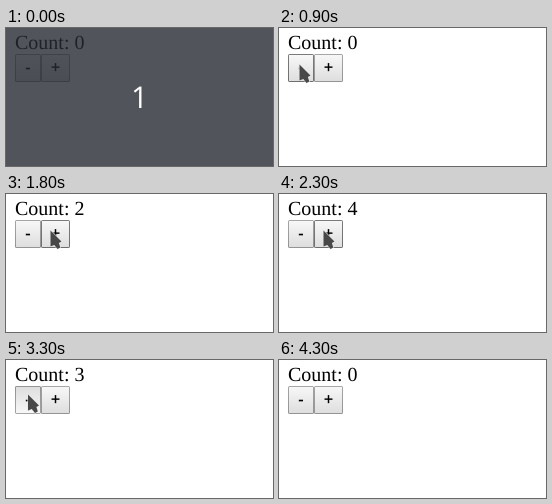
These frames come from a looping animation (267x138 px, 4900 ms). An HTML page with a canvas:

```html
<!DOCTYPE html>
<html lang="en">
<head>
<meta charset="utf-8">
<title>Counter</title>
<style>
  html, body { margin: 0; width: 100%; height: 100%; overflow: hidden; background: #fff; }
  canvas { display: block; width: 267px; height: 138px; }
</style>
</head>
<body>
<canvas id="stage"></canvas>
<script>
const W = 267, H = 138, LOOP = 4900, TICK = 100;
const canvas = document.getElementById('stage');
const ctx = canvas.getContext('2d');
const ratio = window.devicePixelRatio || 1;
canvas.width = W * ratio;
canvas.height = H * ratio;
ctx.scale(ratio, ratio);
ctx.textRendering = 'geometricPrecision';

const SERIF = '20px "Liberation Serif", serif';
const LABEL = '600 16.67px "Open Sans", "Noto Sans", sans-serif';
const DIGIT = '30px "Open Sans", "Noto Sans", sans-serif';

// Each button is clicked four times at a steady pace
const CLICKS = 4, HOLD = 100;
const buttons = [
  { label: '-', x: 9, w: 26, change: -1, first: 3100, every: 300 },
  { label: '+', x: 35, w: 29, change: 1, first: 1500, every: 265 }
];
const TOP = 26, HEIGHT = 28;

// The pointer is visible between SHOW and HIDE and travels through these moves
const SHOW = 600, HIDE = 4300;
const entry = { x: 54, y: 45 };
const moves = [
  { from: 600, to: 900, x: 20.5, y: 36.5 },
  { from: 1000, to: 1100, x: 37, y: 36 },
  { from: 1200, to: 1400, x: 44.5, y: 36.5 },
  { from: 2500, to: 2900, x: 22, y: 34.5 },
  { from: 4100, to: 4300, x: 18, y: 12 }
];

const clamp = (v, lo, hi) => Math.min(hi, Math.max(lo, v));

function pointerAt(t) {
  if (t < SHOW || t >= HIDE) return null;
  let { x, y } = entry;
  for (const m of moves) {
    const k = clamp((t - m.from) / (m.to - m.from), 0, 1);
    x += (m.x - x) * k;
    y += (m.y - y) * k;
  }
  return { x, y };
}

function clicksDone(b, t) {
  return clamp(Math.floor((t - b.first) / b.every) + 1, 0, CLICKS);
}

function countAt(t) {
  return buttons.reduce((sum, b) => sum + b.change * clicksDone(b, t), 0);
}

function text(str, x, y, font, color, align = 'left') {
  ctx.font = font;
  ctx.fillStyle = color;
  ctx.textAlign = align;
  ctx.fillText(str, x, y);
}

function drawButton(b, t, pointer) {
  const { label, x, w } = b;
  const over = pointer && pointer.x >= x && pointer.x < x + w &&
    pointer.y >= TOP && pointer.y < TOP + HEIGHT;
  const down = over && clicksDone(b, t + HOLD) > clicksDone(b, t);
  const fill = ctx.createLinearGradient(0, TOP, 0, TOP + HEIGHT);
  fill.addColorStop(0, down ? '#ddd' : '#f8f8f8');
  fill.addColorStop(1, down ? '#f8f8f8' : '#ddd');
  ctx.fillStyle = fill;
  ctx.fillRect(x, TOP, w, HEIGHT);
  ctx.beginPath();
  ctx.roundRect(x + 0.5, TOP + 0.5, w - 1, HEIGHT - 1, 1);
  ctx.strokeStyle = over && !down ? 'rgba(0,0,0,.5)' : 'rgba(0,0,0,.333)';
  ctx.lineWidth = 1;
  ctx.stroke();
  text(label, x + w / 2, 45, LABEL, '#000', 'center');
}

function drawPointer({ x, y }) {
  const arrow = new Path2D('M0 0V16L3.8 14.4L7 18.5L9.8 17L8.4 12.4L11 11Z');
  ctx.save();
  ctx.translate(x, y);
  ctx.lineJoin = 'round';
  ctx.lineWidth = 1.2;
  ctx.strokeStyle = 'rgba(235,235,235,.9)';
  ctx.stroke(arrow);
  ctx.fillStyle = '#484848';
  ctx.fill(arrow);
  ctx.restore();
}

function drawCountdown() {
  ctx.fillStyle = 'rgba(38,42,49,.8)';
  ctx.fillRect(0, 0, W, H);
  text('1', 133.5, 80, DIGIT, '#fff', 'center');
}

function draw(t) {
  const pointer = pointerAt(t);
  ctx.fillStyle = '#fff';
  ctx.fillRect(0, 0, W, H);
  text('Count: ' + countAt(t), 9, 21.4, SERIF, '#000');
  buttons.forEach(b => drawButton(b, t, pointer));
  if (pointer) drawPointer(pointer);
  if (t < TICK) drawCountdown();
}

const begin = performance.now();
function tick() {
  const t = (performance.now() - begin) % LOOP;
  draw(Math.floor(t / TICK) * TICK);
  requestAnimationFrame(tick);
}
tick();
</script>
</body>
</html>
```
